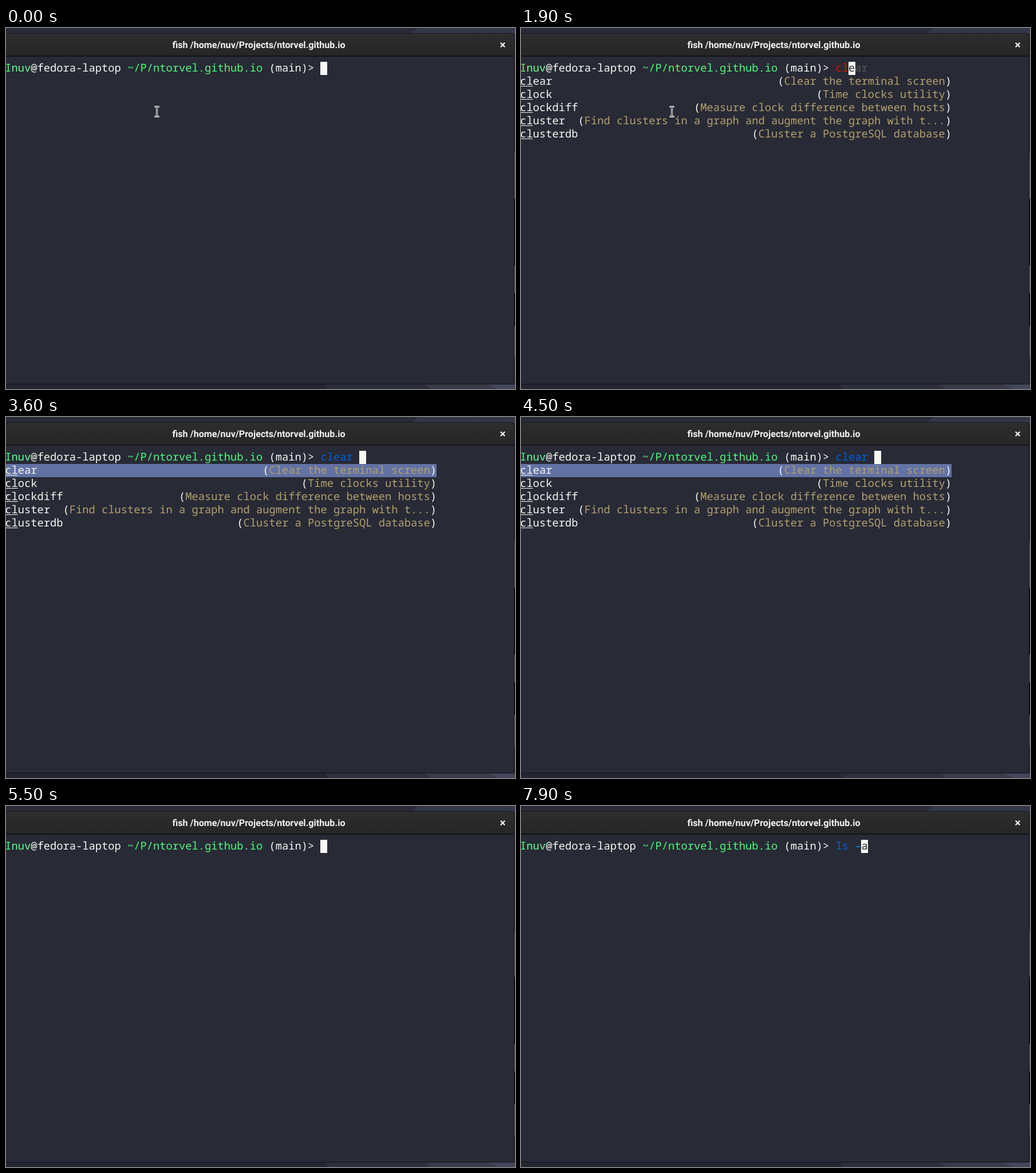
An HTML page that plays this animation: 889 by 630 pixels, repeating every 8000 ms.

```html
<!DOCTYPE html>
<html lang="en">
<head>
<meta charset="utf-8">
<title>Terminal completion</title>
<style>
  html, body { margin: 0; width: 100%; height: 100%; overflow: hidden; background: #282a36; }
  svg { display: block; }
  text { white-space: pre; text-rendering: geometricPrecision; }
  .mono { font: 18.75px "Noto Sans Mono", "DejaVu Sans Mono", monospace; font-variant-ligatures: none; }
  .title { font: 700 16.15px Roboto, "Open Sans", sans-serif; fill: #f4f4f2; text-anchor: middle; }
</style>
</head>
<body>
<svg id="stage" width="889" height="630" viewBox="0 0 889 630">
  <defs>
    <linearGradient id="bar" x1="0" y1="0" x2="0" y2="1">
      <stop offset="0" stop-color="#2d2d2d"/>
      <stop offset="1" stop-color="#262626"/>
    </linearGradient>
    <path id="beam" d="M261 137.5H262.5L263.5 138.5L264.5 137.5H266M263.5 138.5V153.5M261 154.5H262.5L263.5 153.5L264.5 154.5H266"/>
  </defs>

  <!-- desktop behind the window -->
  <rect width="889" height="630" fill="#232530"/>
  <path d="M0 0H720L707 10H0Z" fill="#292b38"/>
  <path d="M720 0H889V300H887V10H707Z" fill="#343747"/>
  <path d="M556 620H728L742 630H562Z" fill="#2d2f3d"/>
  <path d="M728 620H838L858 630H742Z" fill="#393b4b"/>
  <path d="M838 620H889V630H858Z" fill="#444659"/>
  <path d="M888 218H889V298H888ZM888 415H889V463H888ZM888 520H889V574H888Z" fill="#6b6d7a"/>
  <path d="M888 574H889V620H888Z" fill="#3a3c4c"/>
  <path d="M888 298H889V415H888ZM888 463H889V520H888Z" fill="#08090c"/>

  <!-- window -->
  <path d="M0 12Q1 9 5 9H882Q888 9 888 15V622H0Z" fill="#111217"/>
  <path d="M0 13Q1 10 5 10H881Q887 10 887 16V49H0Z" fill="url(#bar)"/>
  <path d="M4 10.5H882" stroke="#363636"/>
  <rect y="48" width="887" height="2" fill="#141414"/>
  <rect y="50" width="887" height="571" fill="#282a36"/>
  <text class="title" x="441.5" y="35">fish /home/nuv/Projects/ntorvel.github.io</text>
  <path d="M863.8 25.8L871.2 33.2M871.2 25.8L863.8 33.2" stroke="#fff" stroke-width="2.1"/>

  <g id="term" class="mono"></g>
  <g id="pointer" fill="none" stroke-linecap="square">
    <use href="#beam" stroke="#fff" stroke-width="3"/>
    <use href="#beam" stroke="#111"/>
  </g>
</svg>
<script>
const CELL = 11.25, ROW = 23, LEFT = -1.8, TOP = 59, BASE = 17;
const LOOP = 8000, INPUT = 49, MENU_COLS = 67, POINTER_END = 2900;
const C = {
  bg: "#282a36", fg: "#f8f8f2", green: "#50fa7b", user: "#69ff94", error: "#ff0000",
  cmd: "#005fd7", opt: "#00afff", hint: "#555555", note: "#b3a06d", pick: "#6272a4"
};
const MENU = [
  ["clear", "Clear the terminal screen"],
  ["clock", "Time clocks utility"],
  ["clockdiff", "Measure clock difference between hosts"],
  ["cluster", "Find clusters in a graph and augment the graph with t..."],
  ["clusterdb", "Cluster a PostgreSQL database"]
];
// time, command, colour, options, hint, cursor shown, menu (1 open, 2 first row picked)
const STEPS = [
  [0, "", C.cmd, "", "", 1, 0],
  [400, "", C.cmd, "", "", 0, 0],
  [900, "c", C.error, "", "", 1, 0],
  [1000, "c", C.error, "", "lear", 1, 0],
  [1400, "cl", C.error, "", "ear", 1, 0],
  [1900, "cl", C.error, "", "ear", 1, 1],
  [2500, "cl", C.error, "", "ear", 0, 1],
  [2900, "cl", C.error, "", "ear", 1, 1],
  [3400, "cl", C.error, "", "ear", 0, 1],
  [3500, "cl", C.error, "", "ear", 1, 1],
  [3600, "clear ", C.cmd, "", "", 1, 2],
  [4000, "clear ", C.cmd, "", "", 0, 2],
  [4500, "clear ", C.cmd, "", "", 1, 2],
  [4600, "clear ", C.cmd, "", "", 1, 0],
  [5400, "", C.cmd, "", "", 0, 0],
  [5500, "", C.cmd, "", "", 1, 0],
  [6100, "", C.cmd, "", "", 0, 0],
  [6400, "l", C.error, "", "s -a", 1, 0],
  [6700, "ls", C.cmd, "", " -a", 1, 0],
  [7100, "ls ", C.cmd, "", "", 1, 0],
  [7200, "ls ", C.cmd, "", "-a", 1, 0],
  [7600, "ls ", C.cmd, "-", "a", 1, 0],
  [7800, "ls ", C.cmd, "-", "", 1, 0],
  [7900, "ls ", C.cmd, "-", "a", 1, 0]
];

const term = document.getElementById("term");
const pointer = document.getElementById("pointer");
const colX = col => LEFT + col * CELL;

function add(parent, tag, attrs) {
  const el = document.createElementNS("http://www.w3.org/2000/svg", tag);
  for (const key in attrs) el.setAttribute(key, attrs[key]);
  return parent.appendChild(el);
}

// Writes text on the character grid and returns the next column.
function write(parent, str, col, row, fill) {
  if (str.trim()) {
    const x = [...str].map((_, i) => colX(col + i)).join(" ");
    add(parent, "text", { x, y: TOP + row * ROW + BASE, fill }).textContent = str;
  }
  return col + str.length;
}

function block(parent, col, row, count, fill) {
  add(parent, "rect", { x: Math.round(colX(col)), y: TOP + row * ROW, width: Math.ceil(count * CELL), height: ROW, fill });
}

function drawMenu(parent, picked) {
  if (picked) block(parent, 0, 1, MENU_COLS, C.pick);
  MENU.forEach(([name, note], i) => {
    const row = i + 1;
    write(parent, name, 0, row, C.fg);
    add(parent, "rect", { x: LEFT, y: TOP + row * ROW + BASE + 2, width: 2 * CELL, height: 1, fill: C.fg });
    let col = write(parent, "(", MENU_COLS - note.length - 2, row, C.fg);
    col = write(parent, note, col, row, C.note);
    write(parent, ")", col, row, C.fg);
  });
}

function drawStep([, cmd, color, opt, hint, cursor, menu]) {
  const g = add(term, "g", { visibility: "hidden" });
  let col = write(g, cmd, INPUT, 0, color);
  col = write(g, opt, col, 0, C.opt);
  if (cursor) {
    block(g, col, 0, 1, C.fg);
    write(g, hint.slice(0, 1), col, 0, C.bg);
    write(g, hint.slice(1), col + 1, 0, C.hint);
  } else {
    write(g, hint, col, 0, C.hint);
  }
  if (menu) drawMenu(g, menu === 2);
  return g;
}

let col = write(term, "I", 0, 0, C.green);
col = write(term, "nuv", col, 0, C.user);
col = write(term, "@fedora-laptop", col, 0, C.fg);
col = write(term, "~/P/ntorvel.github.io", col + 1, 0, C.green);
write(term, "(main)>", col + 1, 0, C.fg);

const groups = STEPS.map(drawStep);
const start = performance.now();

function tick() {
  const t = (performance.now() - start) % LOOP;
  const now = STEPS.findLastIndex(step => step[0] <= t);
  groups.forEach((g, i) => g.setAttribute("visibility", i === now ? "visible" : "hidden"));
  pointer.setAttribute("visibility", t < POINTER_END ? "visible" : "hidden");
  requestAnimationFrame(tick);
}
tick();
</script>
</body>
</html>
```
